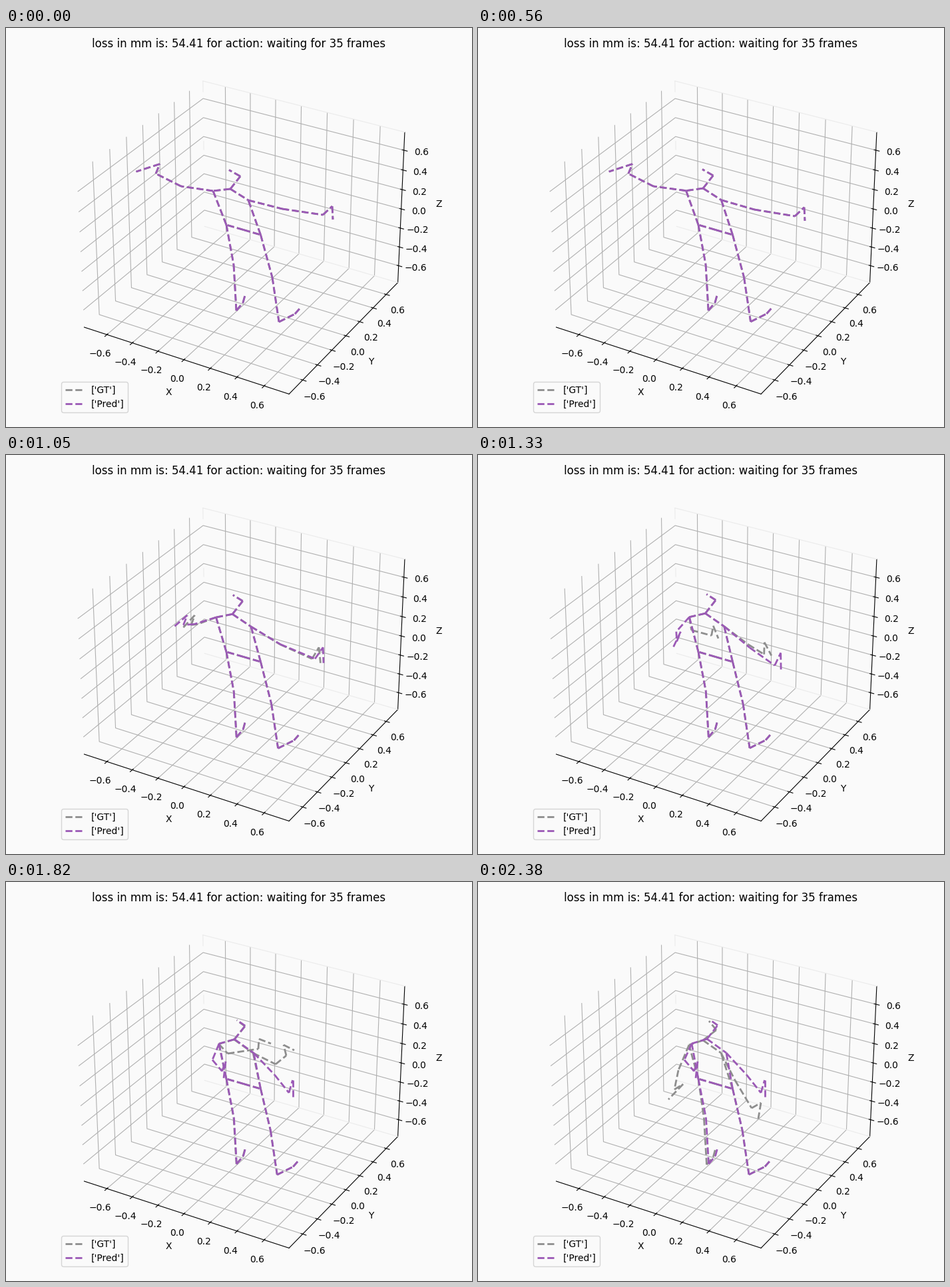
Recreate the animation shown at these times as a matplotlib script. Size 700 px wide and 600 px high, loop 2450 ms.

```python
import numpy as np
import matplotlib.pyplot as plt
from matplotlib.animation import FuncAnimation

FRAMES, STEP = 35, 70
PAPER, FAINT = "#fafafa", "#ebebeb"
TRUTH, GUESS = "#8e8e8e", "#9b59b6"
LIM = 0.78125

# Joints are in stage pixels.
ROOT, HIP_R, HIP_L = (356.7, 303.5), (331, 296), (382.5, 311)
# knee, ankle, foot, toe
LEG_R = np.array([(342, 356), (346, 425), (356, 413), (359, 402)])
LEG_L = np.array([(400, 375), (410, 442), (434, 430), (441, 422)])
# start, slow turn of the trunk, late lean of the true figure
NECK = (337, 242), (7, -6), (-6, 2)
CHIN = (352, 223), (8, -7.5), (-2, 7)
CROWN = (335, 213.5), (13, -6.5), (-1, 2)
SHOULDER_R = (311, 245), (10, -2), (-4, 2)
SHOULDER_L = (364, 259), (9, -2), (-8, 0)


class Arm:
    """Key poses of one arm: elbow, wrist, thumb, fingertip."""

    def __init__(self, spread, folded, raised, hanging, fold_x, fold_y):
        self.spread, self.folded, self.raised, self.hanging = map(
            np.array, (spread, folded, raised, hanging))
        self.fold_x, self.fold_y = fold_x, fold_y

    def guess(self, i):
        pace = np.array([smooth(i, *self.fold_x), smooth(i, *self.fold_y)])
        return mix(self.spread, self.folded, pace)

    def truth(self, i):
        """Leaves the guess sideways first, then upwards, then drops."""
        pace = np.array([smooth(i, 13, 23), smooth(i, 15, 26)])
        up = mix(self.guess(i), self.raised, pace)
        return mix(up, self.hanging, ramp(i, 26, 34) ** 1.5)


def ramp(i, start, end):
    return min(max((i - start) / (end - start), 0), 1)


def smooth(i, start, end):
    u = ramp(i, start, end)
    return u * u * (3 - 2 * u)


def mix(a, b, t):
    return a + (b - a) * t


ARM_R = Arm([(263, 238), (225, 219), (231, 204.5), (195.5, 216)],
            [(310, 267.5), (324.5, 284.5), (330, 270), (327, 295)],
            [(333, 258), (379, 251), (380, 236), (398, 243)],
            [(301, 283), (295, 312), (308, 304), (286, 327)],
            fold_x=(7, 25), fold_y=(8, 21))
ARM_L = Arm([(415, 272), (476, 281), (490, 268), (491, 288)],
            [(403.5, 290), (425, 317), (430.5, 298), (430.5, 323)],
            [(405, 274), (421, 261), (417, 245), (433, 253)],
            [(386, 298), (411, 340), (425, 332), (421, 356)],
            fold_x=(10, 26), fold_y=(6, 20))


def bones(i, true):
    """All bones of one figure as pairs of points."""
    turn = smooth(i, 0, 32)
    lean = smooth(i, 24, 33) if true else 0

    def place(start, shift, tilt):
        return np.array(start) + np.multiply(shift, turn) + np.multiply(tilt, lean)

    neck, chin, crown, sh_r, sh_l = (
        place(*joint) for joint in (NECK, CHIN, CROWN, SHOULDER_R, SHOULDER_L))
    leg_r = place(LEG_R, (0.5, -1), (-3, 1))
    leg_l = place(LEG_L, (-3, -2), (0, 0))
    arm_r, arm_l = (arm.truth(i) if true else arm.guess(i)
                    for arm in (ARM_R, ARM_L))
    chains = [[ROOT, HIP_R, *leg_r], [ROOT, HIP_L, *leg_l],
              [HIP_R, sh_r, *arm_r], [HIP_L, sh_l, *arm_l],
              [neck, sh_r], [neck, sh_l], [neck, chin, crown]]
    return [pair for c in chains for pair in zip(c[:-1], c[1:])]


fig = plt.figure(figsize=(7, 6), dpi=100, facecolor=PAPER)
ax = fig.add_subplot(projection="3d", facecolor=PAPER)
ax.set(xlim=(-LIM, LIM), ylim=(-LIM, LIM), zlim=(-LIM, LIM),
       xlabel="X", ylabel="Y", zlabel="Z")
for axis in (ax.xaxis, ax.yaxis, ax.zaxis):
    axis.set_pane_color(PAPER)
ax.set_title("loss in mm is: 54.41 for action: waiting for 35 frames")

# faint remains of the back wall's outline
for xs, zs in [((-LIM, LIM), (LIM, LIM)), ((-LIM, LIM), (-LIM, -LIM)),
               ((-LIM, -LIM), (LIM, 0.67)), ((-LIM, -LIM), (0.06, 0.15))]:
    ax.plot(xs, (LIM, LIM), zs, color=FAINT, lw=0.8)

for label, color in (("['GT']", TRUTH), ("['Pred']", GUESS)):
    ax.plot([], [], [], "--", lw=2, color=color, label=label)
ax.legend(loc="lower left", facecolor=PAPER)
fig.tight_layout()

stage = fig.add_axes([0, 0, 1, 1])
stage.set(xlim=(0, 700), ylim=(600, 0))
stage.axis("off")

figures = [(true, [stage.plot([], [], "--", lw=2, color=color)[0]
                   for _ in bones(0, true)])
           for true, color in ((True, TRUTH), (False, GUESS))]


def draw(i):
    for true, sticks in figures:
        for stick, (a, b) in zip(sticks, bones(i, true)):
            stick.set_data([a[0], b[0]], [a[1], b[1]])
    return [stick for _, sticks in figures for stick in sticks]


anim = FuncAnimation(fig, draw, frames=FRAMES, interval=STEP,
                     repeat=True, repeat_delay=0)
plt.show()
```
